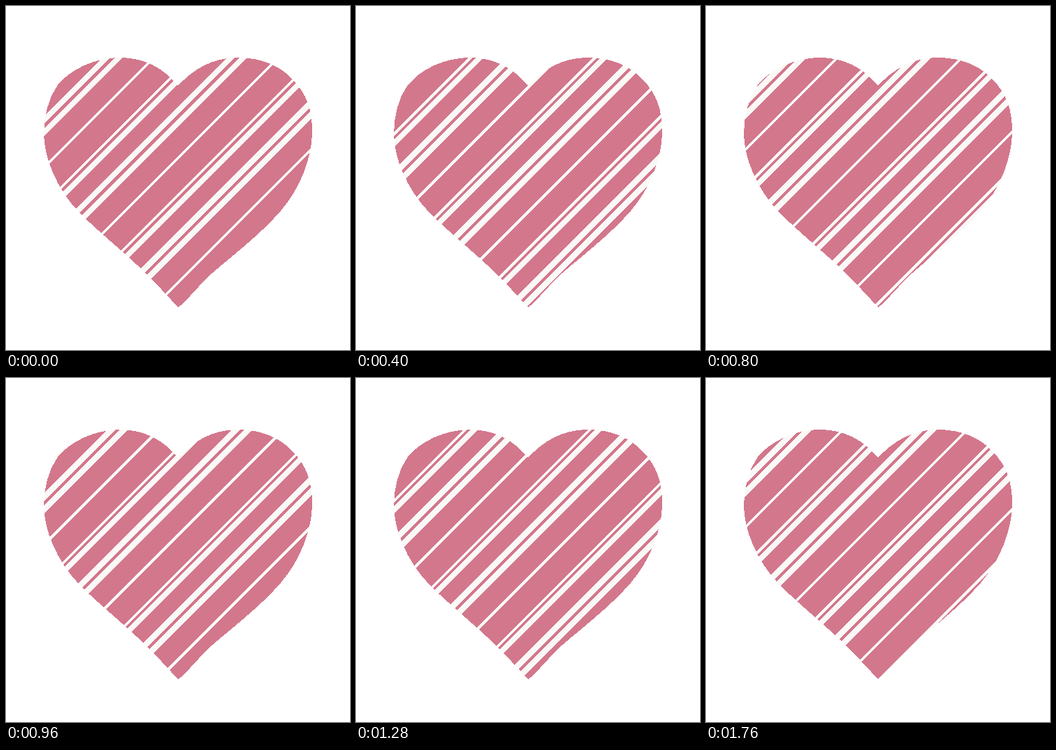
An HTML page for the animation above (1840 ms loop, 500 by 500 pixels).

```html
<!DOCTYPE html>
<html lang="en">
<head>
<meta charset="utf-8">
<title>Striped heart</title>
<style>
  html, body { margin: 0; width: 100%; height: 100%; overflow: hidden; background: #fff; }
  svg { display: block; width: 100%; height: 100%; shape-rendering: crispEdges; }
</style>
</head>
<body>
<svg viewBox="0 0 500 500">
  <rect width="500" height="500" fill="#d3778c"/>
  <g id="stripes" stroke="#faf9f7"></g>
  <!-- White cover with a heart-shaped hole -->
  <path fill="#fff" fill-rule="evenodd" d="M0 0H500V500H0Z
    M250 116 C228 89 200 75 165 75 C130 75 93 92 75 115 C62 133 55 160 55 185
    C55 222 75 267 105 298.5 C130 324.5 172 358 200 385.5 Q224 409 250 438
    C262 430 278 408 300 388 C325 366 368 334 400 297 C428 264 445 220 445 183
    C445 150 437 128 417 107 C400 88 372 75 337 75 C300 75 272 92 250 116Z"/>
</svg>
<script>
  const STEP_MS = 80, STEPS = 23, PERIOD = 181;
  const SHIFT = 2 * PERIOD / STEPS;
  // Each stripe: horizontal offset within a period, horizontal thickness
  const STRIPES = [[40, 12], [58, 12], [108.8, 5.5], [163, 5.5], [176.5, 11]];
  const group = document.getElementById('stripes');

  function addStripe(x, thickness) {
    const line = document.createElementNS('http://www.w3.org/2000/svg', 'line');
    const attributes = { x1: x, y1: 0, x2: x - 500, y2: 500, 'stroke-width': thickness / Math.SQRT2 };
    for (const name in attributes) line.setAttribute(name, attributes[name]);
    group.append(line);
  }

  for (let start = -PERIOD; start < 800; start += PERIOD) {
    for (const [offset, thickness] of STRIPES) addStripe(start + offset, thickness);
  }

  function draw() {
    const step = Math.floor(performance.now() / STEP_MS) % STEPS;
    group.setAttribute('transform', `translate(${step * SHIFT % PERIOD} 0)`);
    requestAnimationFrame(draw);
  }
  draw();
</script>
</body>
</html>
```
